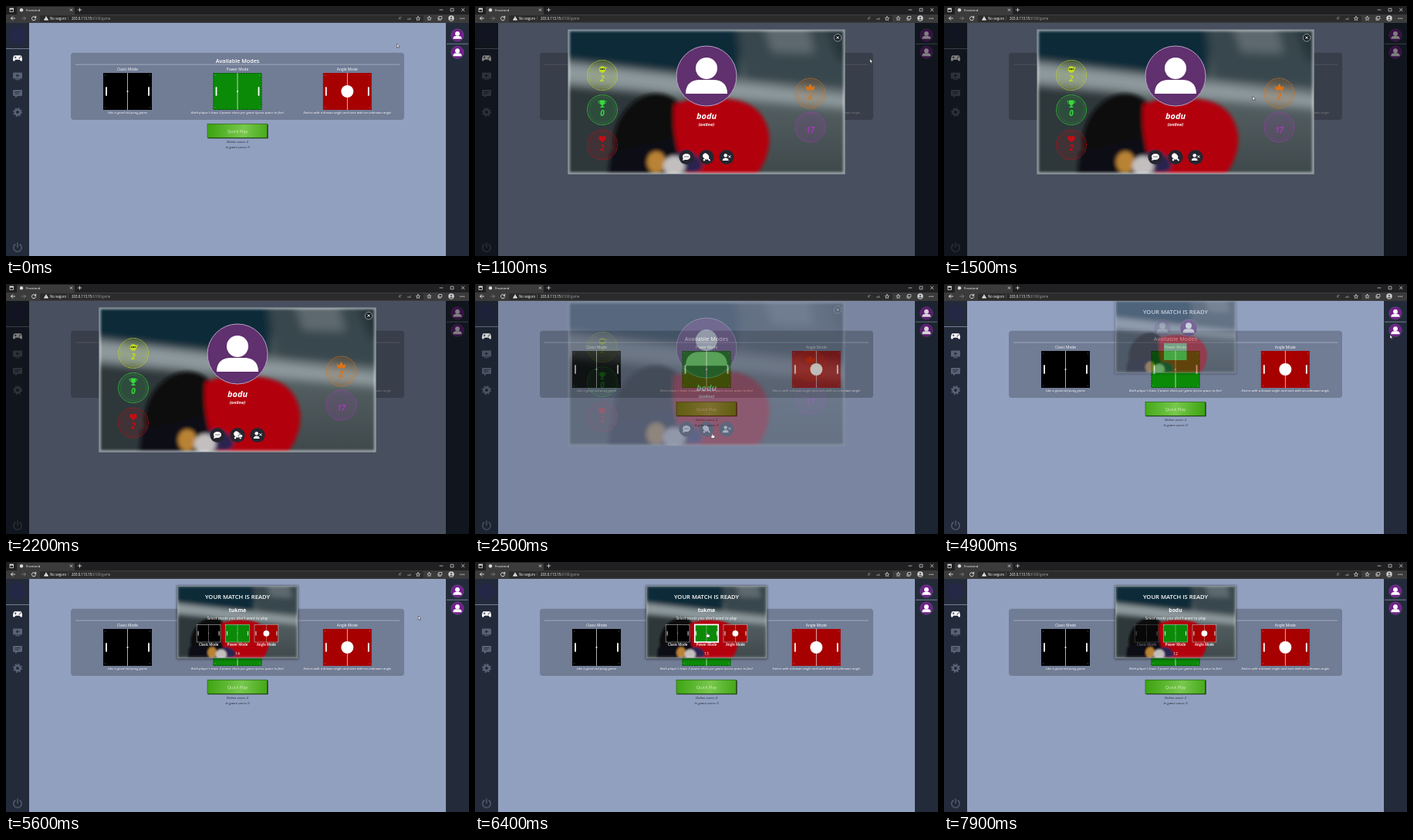
An HTML page for the animation above (8000 ms loop, 600x325 px).

```html
<!DOCTYPE html>
<html lang="en">
<head>
<meta charset="utf-8">
<title>Game lobby</title>
<style>
html, body { margin: 0; width: 100%; height: 100%; overflow: hidden; background: #92a0c0; }
svg { display: block; width: 600px; height: 325px; }
text { font-family: "Open Sans", "Noto Sans", sans-serif; text-anchor: middle; fill: #fff; }
.it { font-style: italic; }
.b { font-weight: 700; }
.m { font-weight: 600; }
.line { fill: none; stroke: #fff; stroke-width: .8; stroke-linecap: round; stroke-linejoin: round; }
</style>
</head>
<body>
<svg id="stage" viewBox="0 0 600 325" xmlns="http://www.w3.org/2000/svg"></svg>
<script>
const LOOP = 8000;
const GUEST = 'tukma', HOST = 'bodu';

// ---- drawing helpers ----
const rect = (x, y, w, h, fill, extra = '') =>
  `<rect x="${x}" y="${y}" width="${w}" height="${h}" fill="${fill}" ${extra}/>`;
const circle = (x, y, r, fill, extra = '') =>
  `<circle cx="${x}" cy="${y}" r="${r}" fill="${fill}" ${extra}/>`;
const oval = (x, y, rx, ry, fill, turn = 0) =>
  `<ellipse rx="${rx}" ry="${ry}" fill="${fill}" transform="translate(${x} ${y}) rotate(${turn})"/>`;
const text = (x, y, size, str, cls = '', extra = '') =>
  `<text x="${x}" y="${y}" font-size="${size}" class="${cls}" ${extra}>${str}</text>`;
const line = (d, extra = '') => `<path class="line" d="${d}" ${extra}/>`;
const shape = (d, fill = '#fff', extra = '') => `<path d="${d}" fill="${fill}" ${extra}/>`;
const at = (x, y, body, scale = 1, extra = '') =>
  `<g transform="translate(${x} ${y}) scale(${scale})" ${extra}>${body}</g>`;

const avatar = (x, y, r, fill) => at(x, y,
  circle(0, 0, 39, fill, 'stroke="#b9a3c6" stroke-width="1"') +
  circle(0, -10, 14, '#fff') +
  shape('M-27 23C-27 10-19 5-9 5H9C19 5 27 10 27 23Z'), r / 39);

function board({ fill, big, dashed }) {
  const corners = [[-29, -21], [29, -21], [-29, 21], [29, 21]]
    .map(([x, y]) => circle(x, y, .6, '#fff', 'opacity=".5"')).join('');
  const edge = dashed
    ? rect(-31, -23.5, 62, 47, 'none', 'stroke="#043d04" stroke-opacity=".7" stroke-dasharray="2 1.5"') : '';
  return rect(-31.5, -24, 63, 48, fill) + edge +
    rect(-.4, -24, .8, 48, '#fff', 'opacity=".85"') + corners +
    rect(-28.4, -5.7, 1.8, 11.4, '#fff') + rect(26.6, -5.7, 1.8, 11.4, '#fff') +
    circle(0, 0, big ? 8 : 1, '#fff');
}

const modes = [
  { name: 'Clasic Mode', fill: '#000', x: 157.5, note: 'Like a good old pong game' },
  { name: 'Power Mode', fill: '#0b8a08', x: 300, dashed: true, note: "Both player's have 3 power shots per game (press space to fire)" },
  { name: 'Angle Mode', fill: '#a60000', x: 442.3, big: true, note: 'Enters with a known angle and exits with an unknown angle' }
];

// ---- icons, centred on 0,0 ----
const icons = {
  pad: c => shape('M-4 -3.6H4Q5.6 -3 6 1.5Q6 4.2 4.6 4Q3.6 3.6 2.6 2H-2.6Q-3.6 3.6 -4.6 4Q-6 4.2 -6 1.5Q-5.6 -3 -4 -3.6Z', c) +
    rect(-4.2, -1.3, 2.8, .8, '#232b3b') + rect(-3.2, -2.3, .8, 2.8, '#232b3b') +
    circle(2.3, -.1, .7, '#232b3b') + circle(3.6, -1.6, .7, '#232b3b'),
  tv: c => rect(-6, -4.5, 12, 8, c, 'rx="1"') + rect(-3, 4.2, 6, 1, c) + shape('M-1.5 -2.6L2.5 -.5L-1.5 1.6Z', '#232b3b'),
  chat: c => shape('M-5 -5H5Q6 -5 6 -4V2Q6 3 5 3H0L-3 5.4V3H-5Q-6 3 -6 2V-4Q-6 -5 -5 -5Z', c) +
    rect(-3.5, -2.7, 7, .9, '#232b3b') + rect(-3.5, -.5, 5, .9, '#232b3b'),
  gear: c => circle(0, 0, 3.3, 'none', `stroke="${c}" stroke-width="2.6"`) +
    circle(0, 0, 5.1, 'none', `stroke="${c}" stroke-width="1.7" stroke-dasharray="2 2.005"`),
  power: c => line('M-3 -4.1A5.2 5.2 0 1 0 3 -4.1M0 -6V-.5', `style="stroke:${c};stroke-width:1.3"`),
  ninja: c => circle(0, 0, 4.3, c) + rect(-3.2, -1.3, 6.4, 1.9, '#2b3436', 'rx="1"') +
    circle(-1.5, -.3, .6, c) + circle(1.5, -.3, .6, c) + shape('M3 -2L6 -4L5 -1Z', c),
  cup: c => shape('M-3 -5H3V-2Q3 1 .7 1.6V3H2.5V4.5H-2.5V3H-.7V1.6Q-3 1 -3 -2Z', c) +
    line('M-3 -3.8H-5.2Q-5 -.8 -2.5 -.3M3 -3.8H5.2Q5 -.8 2.5 -.3', `style="stroke:${c}"`),
  heart: c => shape('M0 4.6L-4.6 0C-6 -3 -2.2 -6 0 -2.7C2.2 -6 6 -3 4.6 0Z', c),
  crown: c => shape('M-4.6 3.5L-6 -2.5L-2.8 -.3L0 -5L2.8 -.3L6 -2.5L4.6 3.5Z', c),
  none: () => ''
};

// ---- parts of the scene ----
function chrome() {
  return rect(0, 0, 600, 11, '#202022') + rect(0, 11, 600, 11, '#3b3b3b') +
    shape('M14 11V3Q14 1 16 1H87Q89 1 89 3V11Z', '#3b3b3b') +
    rect(5, 3, 4.5, 4.5, 'none', 'stroke="#ddd" stroke-width=".8"') + rect(5, 3, 4.5, 1.6, '#ddd') +
    circle(20, 5.2, 2.2, '#d8d8d8') +
    text(26, 6.9, 4.3, 'Frontend', '', 'style="text-anchor:start"') +
    line('M83.2 3.8L85.8 6.4M85.8 3.8L83.2 6.4M95.5 2.8V7.2M93.3 5H97.7', 'opacity=".85"') +
    line('M562 5H566M576.5 3.2H580V6.8H576.5ZM590.5 3L594 6.8M594 3L590.5 6.8', 'style="stroke-width:.6"') +
    rect(44, 12.2, 497, 8.6, '#2b2b2c', 'rx="1.5"') +
    line('M11.5 16H6.5M8.8 13.7L6.5 16L8.8 18.3') +
    line('M20.5 16H25.5M23.2 13.7L25.5 16L23.2 18.3', 'opacity=".35"') +
    line('M38.4 15A2.6 2.6 0 1 0 38.6 16.8M38.7 13.2V15.1H36.8') +
    shape('M52 13.2L55 18.6H49Z') + rect(51.7, 14.9, .6, 1.9, '#2b2b2c') + rect(51.7, 17.3, .6, .6, '#2b2b2c') +
    text(57, 17.8, 4.4, 'No seguro', '', 'style="text-anchor:start"') +
    rect(80.5, 13.5, .5, 5, '#777') +
    `<text x="85" y="17.8" font-size="4.4" style="text-anchor:start">203.0.113.15<tspan fill="#9a9a9a">:8100/game</tspan></text>` +
    text(511, 17.8, 4.6, 'A"', '', 'opacity=".6"') + text(522.5, 17.6, 4, 'aA', '', 'opacity=".6"') +
    line('M534 13.6L534.8 15.3L536.6 15.5L535.3 16.8L535.6 18.6L534 17.7L532.4 18.6L532.7 16.8L531.4 15.5L533.2 15.3Z', 'style="stroke-width:.6"') +
    line('M548.5 13.4L549.3 15.2L551 15.4L549.8 16.7L550.1 18.5L548.5 17.6L546.9 18.5L547.2 16.7L546 15.4L547.7 15.2Z', 'style="stroke-width:.6"') +
    line('M560 14.8V18.3H563.5M561.3 13.5H564.8V17H561.3Z', 'style="stroke-width:.6"') +
    circle(577, 16, 3.7, '#d2d2d2') + circle(577, 15, 1.3, '#666') + shape('M574.5 18Q577 15.5 579.5 18Q577 20 574.5 18Z', '#666') +
    [589, 591.2, 593.4].map(x => circle(x, 16.2, .6, '#fff')).join('');
}

function page() {
  const side = [['tv', 91], ['chat', 114], ['gear', 138], ['power', 314]]
    .map(([k, y]) => at(15, y, icons[k]('#596274'))).join('');
  const cards = modes.map(m =>
    text(m.x, 84.4, 4.85, m.name) + at(m.x, 111, board(m)) +
    text(m.x, 140.3, 4.35, m.note, 'it')).join('');
  return rect(0, 22, 600, 303, '#92a0c0') +
    rect(0, 22, 30, 303, '#232b3b') + rect(570, 22, 30, 303, '#232b3b') +
    circle(15, 38, 11, '#252848', 'id="badge"') +
    rect(0, 55, 30, .8, '#8792a8') + rect(571, 48.8, 28, .8, '#8792a8') +
    at(15, 67.8, icons.pad('#fff')) + side +
    avatar(585, 38, 8.2, '#70208a') + avatar(585, 60.3, 8.2, '#70208a') +
    rect(84, 60.7, 432, 87.3, '#717c95', 'rx="4"') +
    text(300, 74.4, 7.2, 'Available Modes', 'm') +
    rect(90, 75.7, 420, .7, '#b4bccd') + cards +
    rect(261.6, 153.8, 78, 18.4, '#14280c') + rect(261, 153.2, 77.4, 18, 'url(#shine)', 'stroke="#1f5c0c" stroke-width=".6"') +
    text(300, 164.8, 5.5, 'Quick Play', '', 'style="fill:#d3f0bd"') +
    text(300, 177.8, 4.35, 'Online users: 2', 'it', 'style="fill:#20242e"') +
    text(300, 185.3, 4.35, 'In game users: 0', 'it', 'style="fill:#20242e"');
}

// Out-of-focus table, net and bats in flat shapes.
function photo() {
  return `<g id="photo">` + rect(100, 10, 400, 230, 'url(#table)') +
    `<g filter="url(#haze)">` +
    shape('M90 0H350L340 100L90 72Z', '#0d2c38') + shape('M335 0H510V108L350 96Z', '#39464d') +
    shape('M366 0H425L440 62L385 60Z', '#5d696e') + shape('M445 0H510V80L470 70Z', '#26343b') +
    shape('M90 70L510 118V136L90 100Z', '#8d999c') + shape('M90 98L240 112L180 230H90Z', '#2f393b') +
    `</g><g filter="url(#soft)">` +
    oval(228, 168, 46, 56, '#0b0c10', 28) + shape('M176 190L262 170V240H170Z', '#111116') +
    shape('M258 128Q285 116 330 121Q374 126 381 166Q384 198 360 225H275Q254 175 258 128Z', '#b3000c') +
    oval(276, 203, 20, 13, '#2b2150', 20) +
    oval(235, 203, 12, 14, '#b98335') + oval(258, 208, 14, 13, '#c3bfbf') +
    `</g></g>`;
}

function stat(x, y, color, icon, value) {
  return circle(x, y, 19.5, color, `fill-opacity=".12" stroke="${color}" stroke-width=".9" stroke-dasharray="1.6 .8"`) +
    circle(x, y, 16.5, 'none', `stroke="${color}" stroke-opacity=".3" stroke-width="1" stroke-dasharray="1 1"`) +
    at(x, y - 7.5, icons[icon](color)) +
    text(x, y + 7.6, 10, value, 'it b', `style="fill:${color}"`);
}

function profile() {
  const round = (x, body) => circle(x, 196.5, 9.6, '#25252f') + at(x, 196.5, body);
  return `<g clip-path="url(#wide)"><use href="#photo"/>` +
    rect(121, 31, 358, 187, 'none', 'stroke="#dfe8ea" stroke-opacity=".6" stroke-width="4" filter="url(#glow)"') + `</g>` +
    rect(120.8, 31, 358.4, 187.3, 'none', 'stroke="#8f989c" stroke-width=".9"') +
    stat(165, 90, '#c3dc1e', 'ninja', 2) + stat(165, 135, '#35dc3c', 'cup', 0) +
    stat(165, 180.5, '#c40d14', 'heart', 2) + stat(434.5, 113.5, '#dc7416', 'crown', 2) +
    stat(434.5, 157.5, '#a53ab8', 'none', 17) +
    avatar(300, 91, 39, '#60306f') +
    text(300, 147, 11, HOST, 'it b') + text(300, 156, 5.7, '(online)', 'it b') +
    circle(470, 41.2, 4.8, '#1b2328', 'stroke="#d8d8d8" stroke-width=".6"') +
    line('M468.7 39.9L471.3 42.5M471.3 39.9L468.7 42.5', 'style="stroke-width:1"') +
    round(274, oval(0, -.6, 5, 4, '#fff') + shape('M-4 1L-5 4.6L-.5 3Z') + [-2, 0, 2].map(x => circle(x, -.6, .7, '#25252f')).join('')) +
    round(300, oval(-.8, -1, 4.3, 3.5, '#fff', 45) + line('M1.5 1.5L4 4', 'style="stroke-width:1.8"') + circle(-3, 3.6, 1.3, '#fff')) +
    round(326, circle(-1.3, -2.2, 2.3, '#fff') + shape('M-5.3 4.5Q-5 .9 -1.3 .9Q2.4 .9 2.7 4.5Z') + line('M2.6 -2L5.2 .6M5.2 -2L2.6 .6', 'style="stroke-width:1"'));
}

function match() {
  const thumbs = modes.map((m, i) => {
    const x = 262.6 + i * 37.4;
    return `<g id="thumb${i}">` + at(x, 92.8, board(m) +
      rect(-31.5, -23, 63, 46, 'none', 'stroke="#b9bdc0" stroke-width="1.2"'), .49) +
      text(x, 108.8, 4.4, m.name, 'm') + `</g>`;
  }).join('');
  return rect(221, 30.5, 158, 96, '#000', 'opacity=".45" filter="url(#glow)"') +
    `<g clip-path="url(#small)"><g transform="translate(300 78) scale(.505) translate(-300 -124.5)"><use href="#photo"/></g>` +
    rect(222, 31, 156, 94, 'none', 'stroke="#dfe8ea" stroke-opacity=".45" stroke-width="2.5" filter="url(#glow)"') + `</g>` +
    rect(222.3, 31.5, 155.5, 93.3, 'none', 'stroke="#899297" stroke-width=".9"') +
    text(300, 48, 7.65, 'YOUR MATCH IS READY', 'm') +
    `<g id="draw"><g opacity=".3">${avatar(283, 66.5, 11, '#60306f')}</g>${avatar(317, 66.5, 11, '#60306f')}` +
    rect(285, 86.5, 29.5, 22, '#7fc47c') + `</g>` +
    `<g id="pick">` + text(300, 65.4, 6.8, GUEST, 'b', 'id="turn"') +
    text(300, 75.3, 5.15, "Select mode you don't want to play", 'it') + thumbs +
    rect(284.8, 81.4, 30.4, 22.8, 'none', 'id="hover" stroke="#fff" stroke-width="1.7"') +
    text(300, 121.2, 5, '13', '', 'id="count"') + `</g>`;
}

const blur = (id, size) =>
  `<filter id="${id}" x="-10%" y="-10%" width="120%" height="120%"><feGaussianBlur stdDeviation="${size}"/></filter>`;

const stage = document.getElementById('stage');
stage.innerHTML = `<defs>
  ${blur('haze', 6)}${blur('soft', 2.6)}${blur('glow', 1.6)}
  <clipPath id="wide">${rect(121, 31, 358, 187, '#000')}</clipPath>
  <clipPath id="small">${rect(222, 31, 156, 94, '#000')}</clipPath>
  <linearGradient id="table" x1="0" y1="0" x2="0" y2="1">
    <stop offset=".45" stop-color="#566164"/><stop offset="1" stop-color="#3a4446"/>
  </linearGradient>
  <linearGradient id="shine" gradientUnits="userSpaceOnUse" x1="261" y1="158" x2="339" y2="166">
    <stop offset="0" stop-color="#40a514"/><stop offset=".55" stop-color="#78c84e"/><stop offset="1" stop-color="#40a514"/>
  </linearGradient>
  ${photo()}
</defs>
${page()}
${rect(0, 22, 600, 303, '#000', 'id="shade"')}
<g id="profile">${profile()}</g>
<g id="match">${match()}</g>
${chrome()}
<g id="cursor" stroke="#222" stroke-width=".5">
  <path id="arrow" fill="#fff" d="M0 0V5L1.2 4L2 5.8L2.9 5.4L2.1 3.7H3.7Z"/>
  <path id="hand" fill="#fff" d="M-.7 -.5Q0 -1.2 .6 -.5V1.4L3 2Q3.6 2.3 3.4 3.2L2.8 5.5H-.6L-2.3 3Q-2 2 -.7 2.8Z"/>
</g>`;

// ---- motion ----
const $ = id => document.getElementById(id);
const clamp = v => Math.max(0, Math.min(1, v));
const easeOut = v => 1 - Math.pow(1 - clamp(v), 1.7);
const show = (id, on) => $(id).setAttribute('visibility', on ? 'inherit' : 'hidden');

const path = [
  [0, 506.5, 49], [150, 506.5, 49], [550, 585, 37], [800, 585, 37], [1500, 400, 117.5],
  [2200, 303, 194], [2500, 307.5, 195], [2800, 308, 195], [3600, 341, 149.5], [3900, 341, 149.5],
  [4600, 580, 62], [4900, 578, 66], [5450, 578, 66], [6050, 301, 92.5], [6750, 301, 92.5], [7050, 264, 94]
];
const handTimes = [[450, 850], [2150, 2600], [5950, 7100]];

function cursorAt(t) {
  const i = path.findIndex(p => p[0] > t);
  if (i < 0) return path[path.length - 1].slice(1);
  const [t0, x0, y0] = path[i - 1], [t1, x1, y1] = path[i];
  const u = (t - t0) / (t1 - t0), k = u * u * (3 - 2 * u);
  return [x0 + (x1 - x0) * k, y0 + (y1 - y0) * k];
}

function modal(id, t, open, close) {
  const alpha = clamp((t - open) / 150) - clamp((t - close) / 150);
  const drop = easeOut((t - open) / 300) - easeOut((t - close) / 300);
  show(id, alpha > 0);
  $(id).setAttribute('opacity', alpha);
  $(id).setAttribute('transform', `translate(0 ${-15.6 * (1 - drop)})`);
  return alpha;
}

function render(t) {
  $('shade').setAttribute('opacity', .5 * modal('profile', t, 700, 2400));
  modal('match', t, 4825, Infinity);

  const picking = t >= 5400, chosen = t >= 7100;
  show('draw', !picking);
  show('pick', picking);
  show('hover', picking && t >= 5980 && t < 6880);
  $('turn').textContent = chosen ? HOST : GUEST;
  $('thumb0').setAttribute('opacity', chosen ? .35 : 1);
  $('count').textContent = 15 - Math.max(0, Math.floor((t - 4100) / 1000));

  const wave = Math.cos(t / LOOP * 8 * Math.PI);
  $('shine').setAttribute('gradientTransform', `translate(${4 * wave} 0)`);
  $('badge').setAttribute('opacity', .85 + .15 * wave);

  const [x, y] = cursorAt(t);
  const hand = handTimes.some(([a, b]) => t >= a && t < b);
  $('cursor').setAttribute('transform', `translate(${x} ${y})`);
  show('cursor', !chosen);
  show('arrow', !hand);
  show('hand', hand);
}

const start = performance.now();
function tick() {
  render((performance.now() - start) % LOOP);
  requestAnimationFrame(tick);
}
tick();
</script>
</body>
</html>
```
